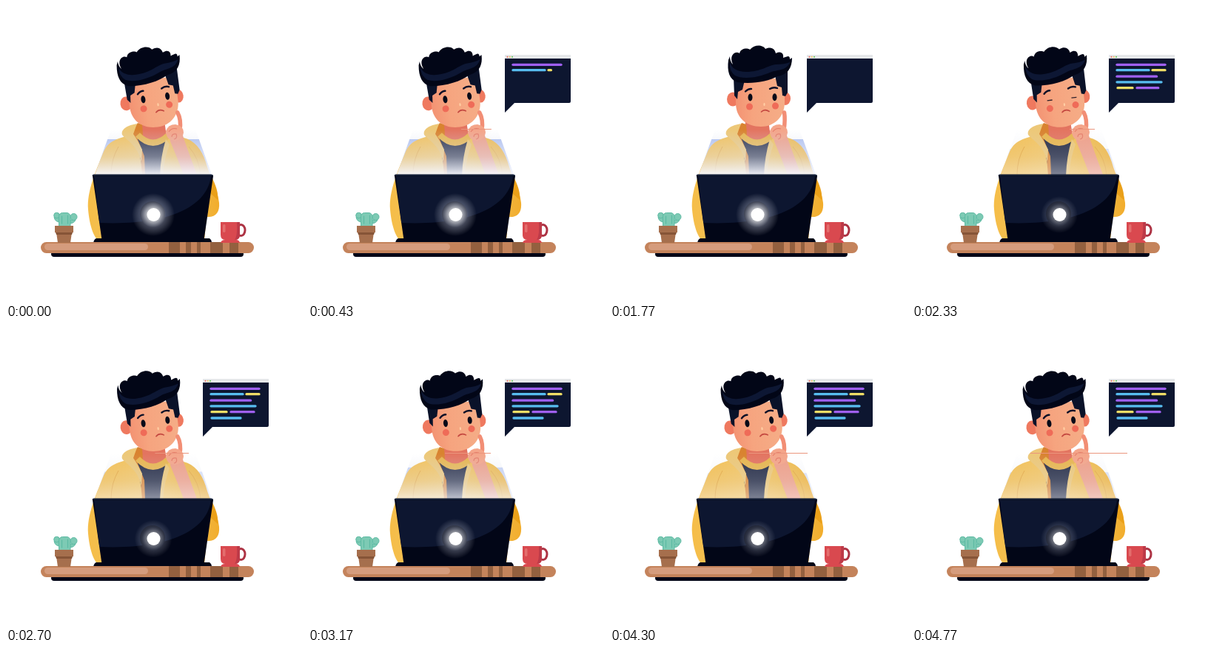
Write an HTML page that moves like this. It is 400x400 px and loops after 4960 ms.

```html
<!DOCTYPE html>
<html lang="en">
<head>
<meta charset="utf-8">
<title>Thinking at the laptop</title>
<style>
html, body { margin: 0; width: 100%; height: 100%; overflow: hidden; background: #fff; }
svg { display: block; width: 100vw; height: 100vh; }
</style>
</head>
<body>
<svg viewBox="0 0 400 400">
  <defs>
    <linearGradient id="beamFill" x1="0" y1="0" x2="0" y2="1">
      <stop offset="0" stop-color="#b3c4f2"/><stop offset="1" stop-color="#eef2ff"/>
    </linearGradient>
    <linearGradient id="hazeFill" x1="0" y1="0" x2="0" y2="1">
      <stop offset="0" stop-color="#d5dbee" stop-opacity="0"/>
      <stop offset=".25" stop-color="#d5dbee" stop-opacity=".22"/>
      <stop offset=".6" stop-color="#e0e5f3" stop-opacity=".45"/>
      <stop offset="1" stop-color="#f6f8ff" stop-opacity=".96"/>
    </linearGradient>
    <linearGradient id="jacket" x1="0" y1="0" x2="1" y2="0">
      <stop offset="0" stop-color="#f5bd48"/><stop offset=".45" stop-color="#f4c766"/>
      <stop offset=".8" stop-color="#f0bb4c"/><stop offset="1" stop-color="#f2ad2c"/>
    </linearGradient>
    <linearGradient id="skin" x1="0" y1="0" x2="1" y2="0">
      <stop offset="0" stop-color="#f39373"/><stop offset=".35" stop-color="#f6a47f"/><stop offset="1" stop-color="#f5ad87"/>
    </linearGradient>
    <radialGradient id="haloFill">
      <stop offset=".25" stop-color="#fff" stop-opacity=".8"/>
      <stop offset=".6" stop-color="#dfe4f5" stop-opacity=".28"/>
      <stop offset="1" stop-color="#fff" stop-opacity="0"/>
    </radialGradient>
    <clipPath id="lid"><path d="M119 227.500H277Q280 227.500 280 230L267.500 316H129.500L117 230Q116 227.500 119 227.500"/></clipPath>
    <clipPath id="top"><rect x="47" y="319" width="288" height="15" rx="7.5"/></clipPath>
  </defs>

  <path id="beam" fill="url(#beamFill)"/>

  <!-- body -->
  <path fill="url(#jacket)" d="M170 174C148 180 138 182 131 199C122 222 109 250 111 275C113 298 119 313 125 317H268L271 285C284 286 289 278 288 266C286 245 275 230 270 211C264 193 255 182 240 178L215 172Z"/>
  <path fill="#eaa019" d="M277 229C284 243 287 252 286 262L273 250Z"/>
  <path fill="none" stroke="#e5a63b" d="M152 190Q142 207 142 228M247 190Q261 206 263 228"/>
  <path fill="#252c45" d="M176 177Q197 188 217 179L211 229H186Z"/>
  <path fill="#e37460" d="M183 155H214L217 176Q200 188 182 176Z"/>
  <path fill="#d98330" d="M178 158L170 170L181 195L184 229H188L187 203L178 180L185 174L184 160Z"/>
  <path fill="#edc878" d="M177 159C165 161 155 166 157 174C163 182 177 187 183 210L184 194Q177 180 172 173Z"/>
  <path fill="none" stroke="#e8b64e" stroke-width="8" d="M178 174Q198 195 219 175"/>
  <path fill="#edc878" d="M216 180L221 187Q214 205 212 229H208Q209 203 216 180"/>

  <!-- head, drawn upright -->
  <g id="head">
    <ellipse cx="166" cy="126" rx="8" ry="9.5" fill="#ef795f"/>
    <ellipse cx="237" cy="125" rx="7" ry="9" fill="#ef795f"/>
    <path fill="url(#skin)" d="M170 98H236V130C236 150 222 163 204 163C184 163 170 151 170 131Z"/>
    <path fill="#0a1229" d="M167 96L182 100L179 113L173 116L172 126L168 121ZM222 89L240 87V117L237 122L233 121L232 110L226 108Z"/>
    <path fill="#020617" d="M166 79C160 66 170 60 175 64C177 56 187 57 189 59C196 51 207 53 210 58C219 54 223 59 224 64C232 60 235 65 234 70C240 68 243 66 243 72L246 70C246 84 240 93 226 95C214 102 192 106 172 103C161 99 158 88 160 73L162 68Q162 75 166 79"/>
    <path fill="#0d1734" d="M162 76C164 84 172 89 184 89C204 89 214 80 224 79Q236 79 243 76C239 87 228 86 218 89C198 98 179 99 169 94Q161 88 162 76"/>
    <path fill="none" stroke="#0a1027" stroke-width="2.400" stroke-linecap="round" d="M183 115.500Q187 111.500 191 112M216 112Q221 109 226 111"/>
    <g id="open" fill="#060a18">
      <ellipse cx="189.500" cy="123.500" rx="3" ry="5"/><ellipse cx="222.500" cy="123.200" rx="3" ry="5"/>
    </g>
    <path id="shut" fill="none" stroke="#30202a" stroke-width="1.3" d="M186 125H193M219 125H226"/>
    <g fill="#ef6b58"><circle cx="188.500" cy="136" r="4.500"/><circle cx="223.500" cy="135" r="4.500"/></g>
    <path stroke="#ffd0a6" stroke-width="2" stroke-linecap="round" d="M208.500 132V134"/>
    <path fill="none" stroke="#c44840" stroke-width="1.600" stroke-linecap="round" d="M204.500 143Q209 138.500 215 142.500"/>
  </g>

  <!-- raised hand -->
  <path fill="#f0a088" d="M222 176L238 172Q243 188 258 228H240Q231 204 222 183Z"/>
  <path id="finger" fill="none" stroke="#f28e75" stroke-width="5.500" stroke-linecap="round"/>
  <path fill="#f4a589" d="M216 169Q219 160 229 160Q240 162 240 171Q239 181 228 182Q216 181 216 169"/>
  <path fill="none" stroke="#e57d69" stroke-width="1.200" d="M220 170Q224 164 231 166M224 177Q224 172 230 173Q232 179 227 180"/>
  <path id="streak" stroke="#ea967e" stroke-width="1.100"/>
  <path id="haze" fill="url(#hazeFill)" d="M142 167H256L278 228H120Z"/>

  <!-- laptop -->
  <g clip-path="url(#lid)">
    <path fill="#020617" d="M110 220H290V320H110Z"/>
    <path fill="#0d1630" d="M119 230H277C272 271 220 297 126 293Z"/>
    <path stroke="#1a2945" stroke-width="1.500" d="M116 228.500H280"/>
  </g>
  <path fill="#020617" d="M122 314H275Q278 316 278 320H118Q119 315 122 314"/>
  <circle cx="198" cy="281" r="17" fill="#060b1c"/>
  <circle id="halo" cx="199" cy="282" fill="url(#haloFill)"/>
  <circle cx="199.500" cy="282" r="9" fill="#fff"/>

  <!-- desk -->
  <rect x="61" y="331" width="260" height="8" rx="4" fill="#020617"/>
  <g clip-path="url(#top)">
    <path fill="#c4835b" d="M47 319H335V334H47Z"/>
    <rect x="52" y="321" width="140" height="9" rx="4.500" fill="#d59c7d"/>
    <path fill="#93603f" d="M220 319H235V334H220ZM243 319H250V334H243ZM258 319H263V334H258ZM276 319H293V334H276ZM302 319H314V334H302Z"/>
  </g>

  <!-- cactus -->
  <g fill="#7dcab4" stroke="#5dbaa3">
    <path d="M65 285Q66 292 73 292V285ZM85 289H94Q92 294 85 294Z"/>
    <circle cx="68.500" cy="283" r="3.800"/><circle cx="91.500" cy="285" r="4.500"/>
    <rect x="71.500" y="279.500" width="15.500" height="24" rx="5"/>
  </g>
  <path stroke="#5dbaa3" stroke-width="1.200" stroke-linecap="round" d="M75.500 284V294M83.500 283V294"/>
  <path fill="#a66f4d" d="M66 297H91V306H89L87 320H70L68 306H66Z"/>
  <path fill="#865437" d="M67 306H90L89 309H68Z"/>

  <!-- mug -->
  <ellipse cx="317.500" cy="303" rx="5.500" ry="7.500" fill="none" stroke="#ad3344" stroke-width="3"/>
  <path fill="#d9494f" d="M290 292H316V309Q316 316 310 316H296Q290 316 290 309ZM290 320Q291 316 296 316H311Q315 316 316 320Z"/>
  <path fill="#bd3a48" d="M312 292H316V309Q316 316 309 316Q313 311 312 292"/>
  <rect x="293" y="295" width="3.500" height="11" rx="1.700" fill="#e36e6d"/>

  <!-- code bubble -->
  <g id="bubble">
    <path fill="#0d1630" d="M266 68H355V129Q355 131 353 131H279L266 144Z"/>
    <path fill="#e6e8ea" d="M266 66H355V71H266Z"/>
    <circle cx="269.500" cy="68.800" r="1" fill="#ed6a5e"/>
    <circle cx="272.800" cy="68.800" r="1" fill="#f4bf4f"/>
    <circle cx="276" cy="68.800" r="1" fill="#61c554"/>
    <g id="code" stroke-width="3.300" stroke-linecap="round"></g>
  </g>
</svg>
<script>
const LOOP = 4960, HOLD = 4770, ROW_TIME = 110, TYPE_DELAY = 185;
const $ = id => document.getElementById(id);
const clamp = v => Math.max(0, Math.min(1, v));
const ease = v => v * v * (3 - 2 * v);

const purple = '#a060f2', blue = '#58bdf0', yellow = '#f0de66';
// y, then segments of [from, to, colour]
const rows = [
  [79.3, [277, 342, purple]],
  [86.7, [277, 320, blue], [325, 342, yellow]],
  [95.2, [277, 330.5, purple]],
  [102.8, [277, 337, blue]],
  [110.7, [278, 298, yellow], [304, 335, purple]],
  [119, [278, 317, blue]]
];
const segments = rows.flatMap(([y, ...parts], row) => parts.map(([from, to, colour], i) => {
  const el = document.createElementNS('http://www.w3.org/2000/svg', 'path');
  el.setAttribute('stroke', colour);
  $('code').append(el);
  return { el, y, from, to, begin: row + i / parts.length, span: 1 / parts.length };
}));

// [time, value] pairs
const tilt = [[0, -7.5], [1130, -7.5], [1720, 0], [1800, 0], [2330, -6.5], [2720, -7.2],
  [3170, -6.5], [3500, -3.8], [3830, -5.5], [4300, -7.5]];
const glow = [[0, 1], [1900, 1], [2330, .32], [2700, .4], [3170, .7], [3830, .25], [4770, .35]];
const streakLeft = [[0, 232], [970, 172], [1770, 236], [2330, 213], [3170, 185], [3830, 215], [4770, 160]];
const streakRight = [[0, 232], [970, 270], [1770, 236], [2330, 247], [3170, 247], [3830, 243], [4770, 291]];

function at(keys, t) {
  const i = keys.findIndex(k => k[0] > t);
  if (i < 0) return keys[keys.length - 1][1];
  const [t0, v0] = keys[i - 1], [t1, v1] = keys[i];
  return v0 + (v1 - v0) * ease((t - t0) / (t1 - t0));
}

function popScale(t) {
  const p = clamp((t - 70) / 220) - 1;
  return 1 + 2.1 * p ** 3 + 1.1 * p ** 2;
}

function draw(t) {
  const angle = at(tilt, t), light = at(glow, t);
  $('head').setAttribute('transform', `rotate(${angle} 209 156)`);
  const blink = Math.abs(t - 2330) < 70;
  $('open').style.display = blink ? 'none' : '';
  $('shut').style.display = blink ? '' : 'none';

  const tip = 235.5 + angle * .5;
  $('finger').setAttribute('d', `M${tip} 144Q237 153 235 168`);
  $('streak').setAttribute('d', `M${at(streakLeft, t)} 166.5H${at(streakRight, t)}`);

  const top = 199 - 19 * light, inset = (228 - top) * .36;
  $('beam').setAttribute('d', `M${120 + inset} ${top}H${278 - inset}L278 228H120Z`);
  $('beam').style.opacity = $('haze').style.opacity = .2 + .8 * light;
  $('halo').setAttribute('r', 23 + 6 * light);
  $('halo').style.opacity = .5 + .5 * light;

  const scale = popScale(t);
  $('bubble').style.display = t > 70 ? '' : 'none';
  $('bubble').setAttribute('transform', `translate(266 144) scale(${scale}) translate(-266 -144)`);

  const cleared = t < 1600 ? 70 : t < 3315 ? 1600 : 3315;
  const row = (t - cleared - TYPE_DELAY) / ROW_TIME;
  for (const { el, y, from, to, begin, span } of segments) {
    const p = clamp((row - begin) / span);
    el.setAttribute('d', p ? `M${from} ${y}H${from + (to - from) * p}` : '');
  }
}

function tick() {
  draw(Math.min(performance.now() % LOOP, HOLD));
  requestAnimationFrame(tick);
}
tick();
</script>
</body>
</html>
```
